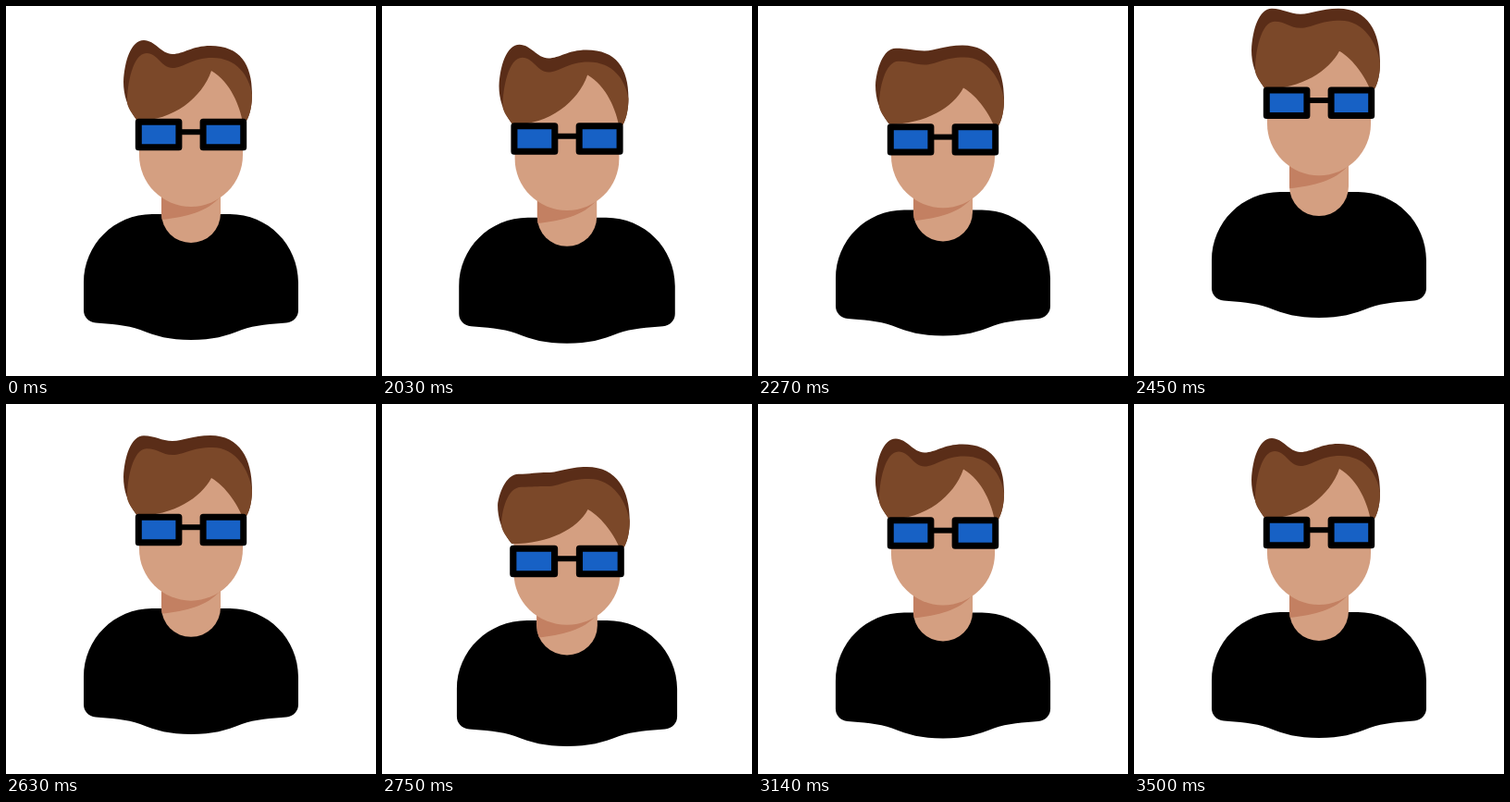
An HTML page for the animation above (3530 ms loop, 400x400 px).

```html
<!DOCTYPE html>
<html lang="en">
<head>
<meta charset="utf-8">
<title>Hopping avatar</title>
<style>
html, body { margin: 0; width: 100%; height: 100%; overflow: hidden; background: #fff; }
svg { display: block; width: 100vw; height: 100vh; }
</style>
</head>
<body>
<svg viewBox="0 0 400 400">
  <defs><clipPath id="neckClip"><path id="neckEdge"/></clipPath></defs>
  <g id="figure">
    <path id="body" d="M158 225H242C283 225 316 258 316 299V329C316 336 311 341.500 303 342.500C288 343.500 269 345 255 350C237 357 224 361 200 361C176 361 163 357 145 350C131 345 112 343.500 97 342.500C89 341.500 84 336 84 329V299C84 258 117 225 158 225Z"/>
    <path id="neck" fill="#d49f81"/>
    <g clip-path="url(#neckClip)">
      <path id="shade" fill="#c38062" d="M160 170H240V199L232 206C217 223 195 228 168 231H160Z"/>
    </g>
    <path id="hairBack" fill="#5a2d18"/>
    <path id="face" fill="#d49f81"/>
    <path id="hair" fill="#7b4829"/>
    <g id="glasses" stroke="#000" stroke-width="7" stroke-linejoin="round">
      <path d="M188 136.200H212" stroke-width="6"/>
      <rect x="143.300" y="125.300" width="43.600" height="27.400" fill="#1761c5"/>
      <rect x="213.100" y="125.300" width="43.600" height="27.400" fill="#1761c5"/>
    </g>
  </g>
</svg>
<script>
const LOOP = 3530, REST = 2000, STEP = 30, END = 50;
const el = id => document.getElementById(id);
const setPath = (id, d) => el(id).setAttribute('d', d);
const shift = (id, y) => el(id).setAttribute('transform', `translate(0 ${y})`);

// Each part swings through crouch, leap, landing, rebound and settling,
// one half sine wave each; the head lags behind the body.
const SETTLE = 37.2;
const parts = {
  body: { ends: [8.2, 21.7, 31, SETTLE, END], amps: [10, -24, 10, -7, 2.5] },
  chin: { ends: [9.3, 21.5, 32.5, SETTLE, END], amps: [12, -34, 26, -7, 2.5] },
  brow: { ends: [10.2, 21.3, 33, SETTLE, END], amps: [15, -35, 37, -8, 2.5] }
};

function swing({ ends, amps }, n) {
  const i = ends.findIndex(e => n <= e), from = i ? ends[i - 1] : 0;
  return amps[i] * Math.sin(Math.PI * (n - from) / (ends[i] - from));
}

function ramp(n, a, b) {
  const u = Math.max(0, Math.min(1, (n - a) / (b - a)));
  return u * u * (3 - 2 * u);
}

function drawHair(flat, quiff) {
  const dip = -9 * flat, top = -6 * flat, tip = 13 * flat, left = -0.5 * quiff;
  // the bump, dip and crown are shared by both layers
  const crest = (x, bump, valley, crown, cx) =>
    `${x} ${bump + quiff}C${x + 12} ${bump + quiff} 168 ${valley + dip} 180 ${valley + dip}` +
    `C192 ${valley + dip} 201 ${crown + top} ${cx} ${crown + top}`;
  setPath('hairBack', `M141 ${123 + left}C131 ${109 + left} 127 ${96 + left} 127 ${82 + left}` +
    `C128 ${60 + quiff} 135 ${37 + quiff} ` + crest(149, 37, 52, 43, 221) +
    `C253 ${43 + top} 266 63 266 95C266 106 264 117 260 124Z`);
  setPath('hair', `M142 ${124 + left}C136 ${116 + left} 131 ${109 + left} 131 ${104 + left}` +
    `C131 85 137 ${51 + quiff} ` + crest(152, 51, 67, 56, 223) +
    `C249 ${56 + top} 263 75 266 96C266 107 264 117 260 124L256 126` +
    `C${253 - 2 * flat} ${109 + 4 * flat} ${243 - 5 * flat} ${82 + 10 * flat} 222 ${70 + tip}` +
    `C${212 - flat} ${99 + 5 * flat} 181 ${124 + left} 142 ${124 + left}Z`);
}

function draw(ms) {
  const t = ms % LOOP;
  const n = Math.max(0, Math.min(END, Math.floor((t - REST) / STEP + 1e-6)));
  const body = swing(parts.body, n), chin = swing(parts.chin, n), brow = swing(parts.brow, n);
  const flat = ramp(n, 2, 9) * (1 - ramp(n, 30, 37));
  const quiff = 0.35 * Math.max(0, brow - body);
  const sx = 1 + Math.max(0, body + chin) / 1160;
  el('figure').setAttribute('transform', `translate(${200 - 200 * sx} 0) scale(${sx} 1)`);
  shift('body', body);
  shift('shade', chin);
  for (const id of ['hairBack', 'hair', 'glasses']) shift(id, brow);

  const collar = 224 + (body + chin) / 2;
  const neck = `M168 ${170 + chin}H232V${collar}A32 32 0 0 1 168 ${collar}Z`;
  setPath('neck', neck);
  setPath('neckEdge', neck);
  setPath('face', `M144 ${161 + chin}A56 56 0 0 0 256 ${161 + chin}V${92 + brow}` +
    `L222 ${62 + brow}L144 ${102 + brow}Z`);
  drawHair(flat, quiff);
}

const start = performance.now();
function tick(now) {
  draw(Math.max(0, now - start));
  requestAnimationFrame(tick);
}
draw(0);
requestAnimationFrame(tick);
</script>
</body>
</html>
```
